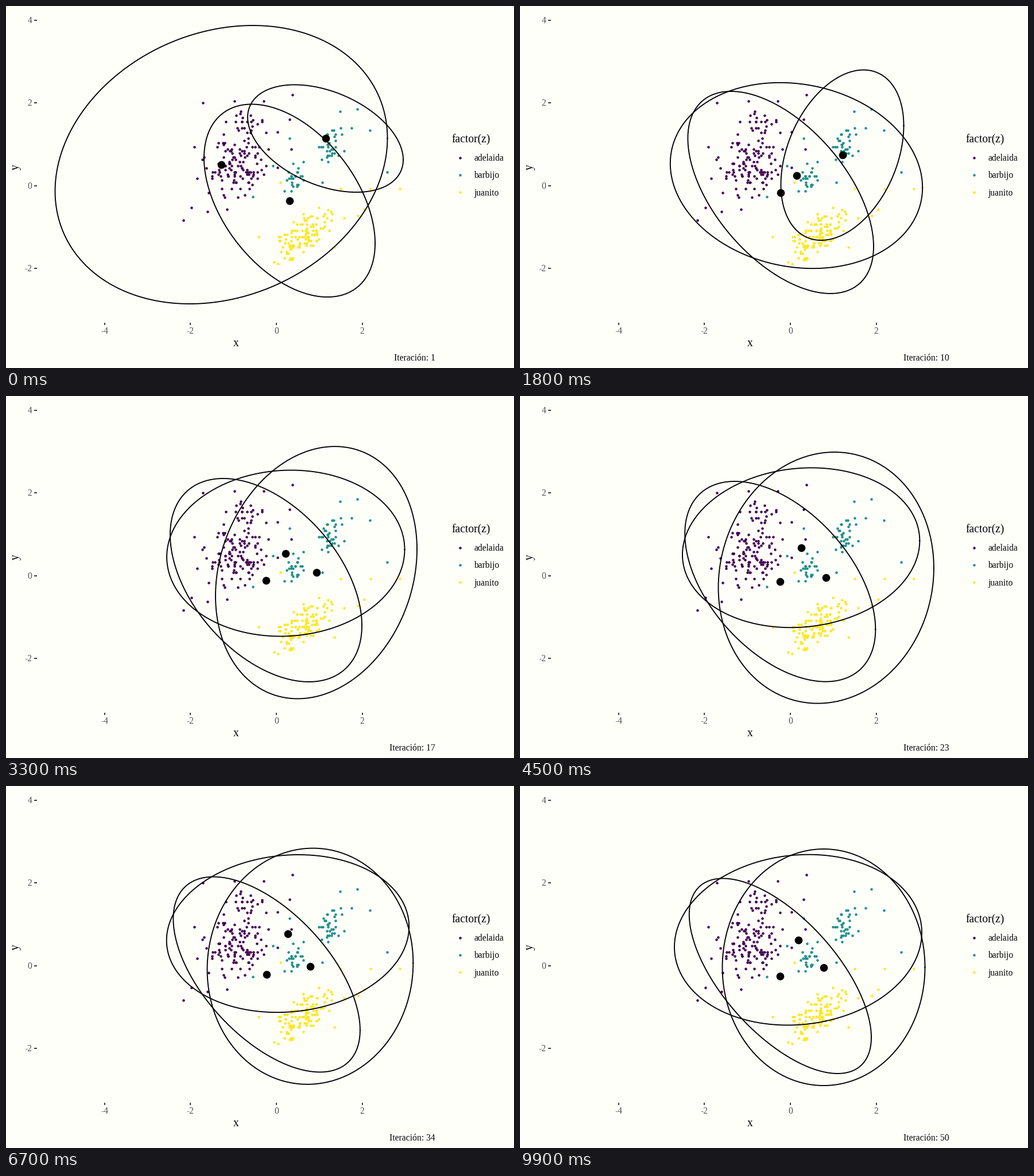
A matplotlib script for the animation above (10000 ms loop, 885 by 632 pixels).

```python
import numpy as np
import matplotlib.pyplot as plt
from matplotlib.animation import FuncAnimation

W, H, DPI = 885, 632, 64
PT = 72 / DPI  # points per pixel
FRAMES, STEPS = 100, 50
INK, GREY = "#000000", "#4D4D4D"
SMALL, LARGE = 15.64, 19.56
X0, XU, Y0, YU = 471.0, 74.85, 313.5, 72.1  # pixel position of data units

plt.rcParams["font.family"] = "Liberation Serif"
fig = plt.figure(figsize=(W / DPI, H / DPI), dpi=DPI, facecolor="#FFFFFA")
ax = fig.add_axes([0, 0, 1, 1])
ax.set_xlim(0, W)
ax.set_ylim(H, 0)
ax.axis("off")


def label(x, y, s, size=SMALL, color=INK, ha="left", **kw):
    return ax.text(x, y, s, fontsize=size * PT, color=color, ha=ha,
                   va="baseline", **kw)


def dots(x, y, size, color, z):
    return ax.plot(x, y, "o", ms=size * PT, mew=0, color=color, zorder=z)[0]


def tick(xs, ys):
    ax.plot(xs, ys, color="#333333", lw=1.9 * PT, solid_capstyle="butt")


# Axes
for v in range(-4, 5, 2):
    px, py = X0 + v * XU, Y0 - v * YU
    if v < 4:
        tick([px, px], [552.6, 557.4])
        label(px, 572.3, str(v), color=GREY, ha="center")
    if v > -4:
        tick([49.2, 54], [py, py])
        label(45, py + 5.2, str(v), color=GREY, ha="right")
label(400.5, 594, "x", LARGE, ha="center")
label(22.3, 281, "y", LARGE, ha="center", rotation=90,
      rotation_mode="anchor")

# Point groups: a few outlying points, the rest as seeded normal clouds.
# Cloud: count, centre x, centre y, sd x, sd y, correlation
ADELAIDA = [(343, 169), (499, 155), (449, 166), (398, 166), (494, 198),
            (473, 220), (497, 250), (328, 246), (309, 374), (323, 352),
            (351, 359), (385, 355), (473, 282)]
BARBIJO = [(612, 180), (582, 184), (634, 217), (664, 290), (602, 213),
           (494, 231), (465, 279), (430, 333), (551, 308)]
JUANITO = [(686, 319), (635, 319), (583, 319), (478, 308), (624, 355),
           (613, 366), (589, 370), (572, 421), (440, 403)]
GROUPS = [
    ("adelaida", "#440154", ADELAIDA,
     [(121, 400, 275, 35, 34, -0.35), (17, 416, 199, 19, 11, 0)]),
    ("barbijo", "#21908C", BARBIJO,
     [(34, 567, 243, 13, 20, -0.2), (25, 502, 301, 11, 19, -0.2)]),
    ("juanito", "#FDE725", JUANITO, [(114, 518, 398, 30, 28, -0.72)]),
]


def cloud(rng, n, cx, cy, sx, sy, r):
    u = rng.standard_normal((n * 5, 2))
    u = u[np.hypot(*u.T) < 1.95][:n]
    x = cx + sx * u[:, 0]
    y = cy + sy * (r * u[:, 0] + np.sqrt(1 - r * r) * u[:, 1])
    return np.column_stack([x, y])


def snap(p):
    """Measurements come in tenths, so the points sit on a fine lattice."""
    step = np.array([1.37, 3.65])
    base = np.array([X0, 169.4])
    return base + np.round((p - base) / step) * step


rng = np.random.default_rng(12)
label(776, 238, "factor(z)", LARGE)
for i, (name, color, edge, clouds) in enumerate(GROUPS):
    pts = np.vstack([edge] + [snap(cloud(rng, *c)) for c in clouds])
    dots(pts[:, 0], pts[:, 1], 4.5, color, 2)
    ly = 264.8 + 30.3 * i
    dots([790.5], [ly], 4.5, color, 2)
    label(815, ly + 5.2, name)

# Ellipses over time: centre x, centre y, half width, half height, correlation
KEYS = np.array([0, 11, 18, 25, 33, 57, 99])
WIDE = [(375, 277, 289.5, 243, 0.19), (460, 292, 218, 177, -0.06),
        (481.5, 296, 219.7, 162.2, -0.13), (485.5, 284, 213, 152, -0.05),
        (487.3, 274.5, 207.2, 145, 0.045), (491, 259.5, 210, 137.7, 0.08),
        (484.5, 268.6, 215.5, 148.9, 0.085)]
RIGHT = [(556.5, 231.3, 135.5, 93.8, -0.395), (566, 246, 108, 118, 0.05),
         (561.5, 260.3, 107, 148.7, 0.345), (553, 284, 138, 205, 0.37),
         (540.5, 308.3, 175.5, 220.2, 0.185), (532, 313.3, 179, 208.7, 0.06),
         (529, 316.5, 176.5, 206.5, 0)]
LOW = [(494, 339.8, 149, 168.3, -0.443), (462, 328, 160, 176, -0.53),
       (454.2, 325.5, 161.8, 176.5, -0.535), (453.7, 322, 166, 178, -0.48),
       (453, 321.5, 167, 177.5, -0.447), (454, 327.3, 164, 171.8, -0.54),
       (453.4, 331.7, 158.6, 170.3, -0.63)]
PATHS = [np.array(p, float) for p in (WIDE, RIGHT, LOW)]
SLOPES = [np.gradient(p, KEYS, axis=0, edge_order=2) for p in PATHS]


def pose(p, m, t):
    """Cubic Hermite interpolation between the keys."""
    i = min(np.searchsorted(KEYS, t, "right") - 1, len(KEYS) - 2)
    h = KEYS[i + 1] - KEYS[i]
    s = (t - KEYS[i]) / h
    return ((1 + 2 * s) * (1 - s) ** 2 * p[i] + s * (1 - s) ** 2 * h * m[i]
            + s * s * (3 - 2 * s) * p[i + 1] + s * s * (s - 1) * h * m[i + 1])


ANGLE = np.linspace(0, 2 * np.pi, 181)
rings = [ax.plot([], [], color=INK, lw=1.9 * PT, zorder=3)[0] for _ in PATHS]
centres = dots([], [], 13.6, INK, 4)
caption = label(748, 619, "", ha="right")


def draw(f):
    poses = [pose(p, m, f) for p, m in zip(PATHS, SLOPES)]
    for ring, (cx, cy, hw, hh, r) in zip(rings, poses):
        ring.set_data(cx + hw * np.cos(ANGLE),
                      cy - hh * np.cos(ANGLE - np.arccos(r)))
    centres.set_data([q[0] for q in poses], [q[1] for q in poses])
    step = round(1 + (STEPS - 1) * f / (FRAMES - 1))
    caption.set_text(f"Iteración: {step}")
    return [*rings, centres, caption]


anim = FuncAnimation(fig, draw, frames=FRAMES, interval=100, repeat=True,
                     repeat_delay=0, blit=False)
plt.show()
```
